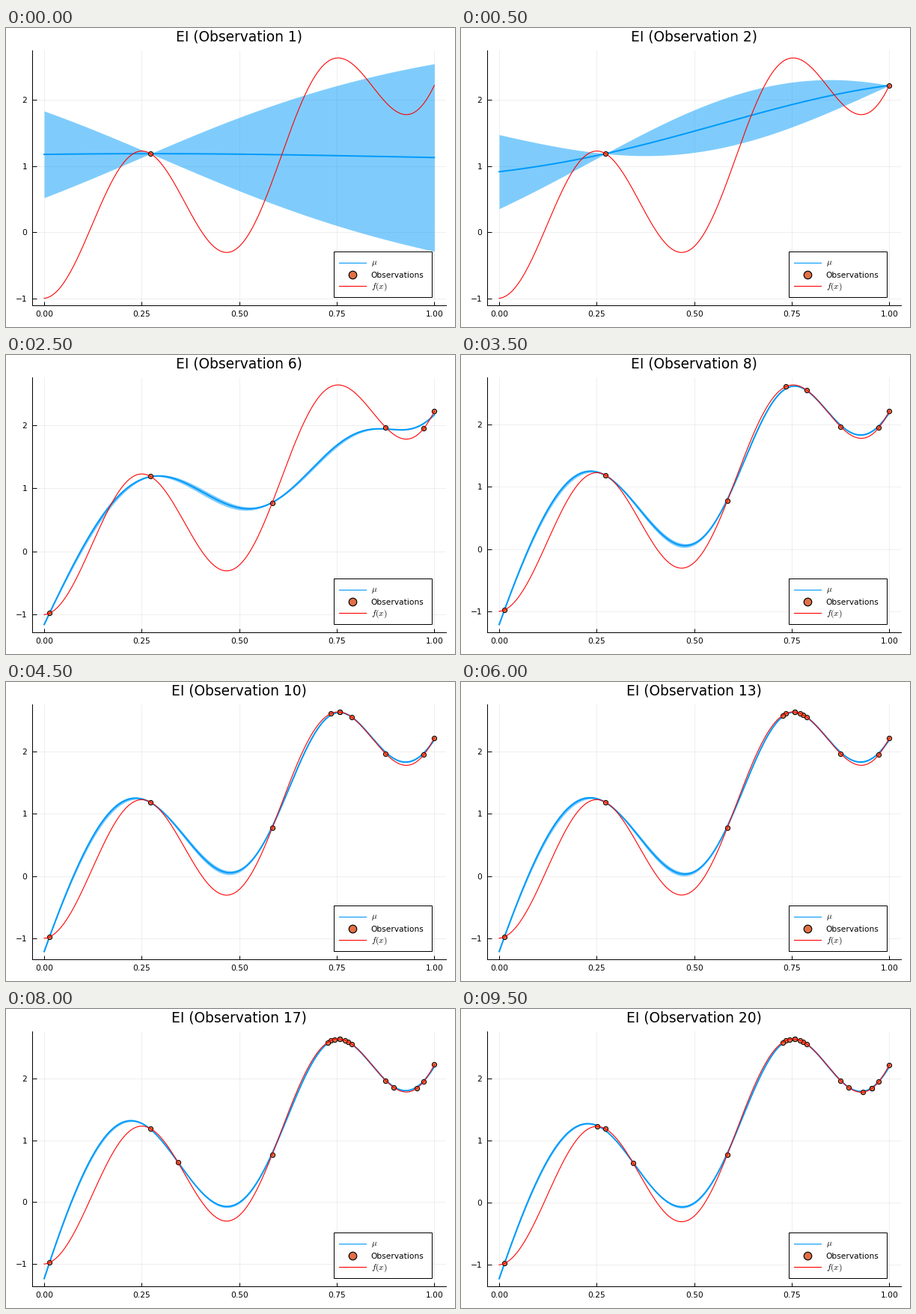
Recreate the animation shown at these times as a matplotlib script. Size 600 px wide and 400 px high, loop 10000 ms.

```python
import numpy as np
import matplotlib.pyplot as plt
from matplotlib.animation import FuncAnimation
from matplotlib.patches import Rectangle

W, H, DPI = 600, 400, 100
PX = 72 / DPI                      # points per pixel
LEFT, RIGHT, TOP, BOTTOM = 35.4, 588, 30.4, 371.2
BLUE, ORANGE, RED = "#009afa", "#e26f46", "#ff0000"

plt.rcParams.update({
    "font.family": "DejaVu Sans",
    "mathtext.fontset": "cm",
    "axes.unicode_minus": True,
})

# Sampling points in the order they are picked
SAMPLES = np.array([
    0.2725, 1.0, 0.8755, 0.0137, 0.5845, 0.973, 0.789, 0.734, 0.757, 0.757,
    0.7265, 0.778, 0.7716, 0.956, 0.343, 0.744, 0.896, 0.956, 0.932, 0.2505,
])
NOISE_VAR = 1e-5
PRIOR_MEAN = 1.0
GRID = np.linspace(0, 1, 401)


def objective(x):
    return -np.cos(13 * x) + 0.5 * x + 1.46 * x**2 + 1.17 * x**3


def matern52(a, b):
    r = np.sqrt(5) * np.abs(a[:, None] - b[None, :])
    return (1 + r + r**2 / 3) * np.exp(-r)


def posterior(x_obs, x_new):
    """Mean and 95 % half width of the Gaussian process."""
    k_obs = matern52(x_obs, x_obs) + NOISE_VAR * np.eye(len(x_obs))
    k_new = matern52(x_obs, x_new)
    weights = np.linalg.solve(k_obs, k_new)
    mean = PRIOR_MEAN + weights.T @ (objective(x_obs) - PRIOR_MEAN)
    var = 1 - np.sum(k_new * weights, axis=0)
    return mean, 1.96 * np.sqrt(np.maximum(var, 0))


fig = plt.figure(figsize=(W / DPI, H / DPI), dpi=DPI, facecolor="white")

ax = fig.add_axes([LEFT / W, 1 - BOTTOM / H, (RIGHT - LEFT) / W, (BOTTOM - TOP) / H])
ax.set_xlim(-0.03, 1.03)
ax.set_xticks([0, 0.25, 0.5, 0.75, 1], ["0.00", "0.25", "0.50", "0.75", "1.00"])
ax.set_yticks([-1, 0, 1, 2], ["\u22121", "0", "1", "2"])
ax.tick_params(direction="in", length=5.5 * PX, width=PX, labelsize=10.67 * PX)
ax.tick_params(axis="x", pad=6.5 * PX)
ax.tick_params(axis="y", pad=7.2 * PX)
ax.grid(color="black", alpha=0.1, linewidth=0.6 * PX)
ax.set_axisbelow(True)
ax.spines[["top", "right"]].set_visible(False)
ax.spines[["left", "bottom"]].set_linewidth(PX)

truth = objective(GRID)
band = ax.fill_between(GRID, truth, truth, color=BLUE, alpha=0.5, linewidth=0, zorder=2)
mean_line, = ax.plot([], [], color=BLUE, lw=2 * PX, zorder=3)
dots, = ax.plot([], [], "o", ms=6.2 * PX, mfc=ORANGE, mec="black", mew=PX, zorder=4)
ax.plot(GRID, truth, color=RED, lw=1.1 * PX, zorder=5)

# Overlay in pixel coordinates for title and legend
top = fig.add_axes([0, 0, 1, 1])
top.set_xlim(0, W)
top.set_ylim(H, 0)
top.axis("off")
title = top.text(311.7, 18, "", fontsize=18.67 * PX, ha="center", va="baseline")

top.add_patch(Rectangle((438.2, 299.2), 131, 61, fc="white", ec="black", lw=PX))
top.plot([444.5, 481], [314.2, 314.2], color=BLUE, lw=1.1 * PX)
top.plot([462.5], [329.8], "o", ms=10.5 * PX, mfc=ORANGE, mec="black", mew=1.2 * PX)
top.plot([444.5, 481], [345.2, 345.2], color=RED, lw=1.1 * PX)
top.text(487.5, 317, r"$\mu$", fontsize=11.3 * PX, va="baseline")
top.text(487.8, 334.5, "Observations", fontsize=10.67 * PX, va="baseline")
top.text(487.5, 348.5, r"$f(x)$", fontsize=11.3 * PX, va="baseline")


def update(frame):
    x_obs = SAMPLES[:frame + 1]
    mean, half = posterior(x_obs, GRID)
    low, high = mean - half, mean + half

    outline = np.column_stack([np.r_[GRID, GRID[::-1]], np.r_[low, high[::-1]]])
    band.set_verts([outline])
    mean_line.set_data(GRID, mean)
    dots.set_data(x_obs, objective(x_obs))
    title.set_text(f"EI (Observation {frame + 1})")

    y_min, y_max = min(low.min(), truth.min()), max(high.max(), truth.max())
    margin = 0.03 * (y_max - y_min)
    ax.set_ylim(y_min - margin, y_max + margin)
    return band, mean_line, dots, title


anim = FuncAnimation(fig, update, frames=len(SAMPLES), interval=500,
                     repeat=True, repeat_delay=0, blit=False)
plt.show()
```
